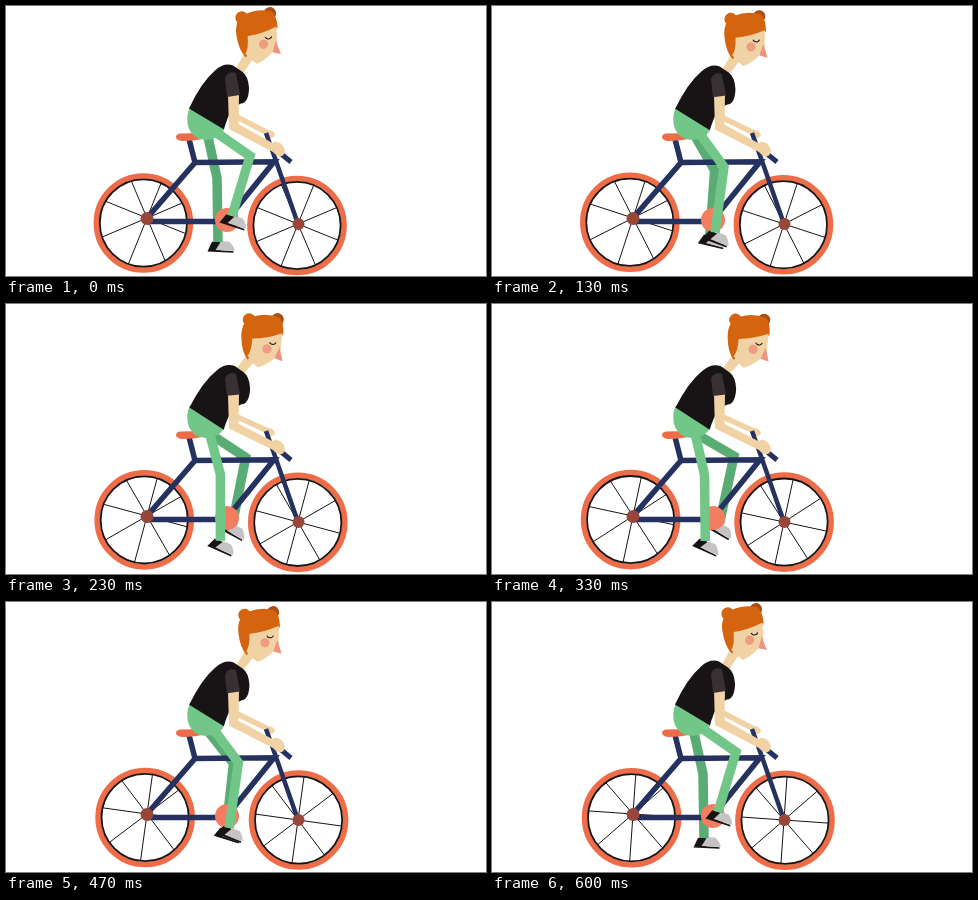
Animation, 480 px wide and 270 px high, one loop 630 ms. Source, as an HTML page with a canvas:

```html
<!DOCTYPE html>
<html lang="en">
<head>
<meta charset="utf-8">
<title>Cyclist</title>
<style>
html, body { margin: 0; width: 100%; height: 100%; overflow: hidden; background: #fff; }
canvas { display: block; width: 480px; height: 270px; }
</style>
</head>
<body>
<canvas id="stage" width="480" height="270"></canvas>
<script>
const ctx = document.getElementById('stage').getContext('2d');
const LOOP = 630, RAD = Math.PI / 180;
const C = {
  tire: '#ee6c47', disc: '#f37d60', hub: '#98463a', navy: '#25325f', ink: '#181415',
  green: '#71c688', shade: '#5aac75', skin: '#f1d2a4', hair: '#d4650e', bun: '#ab4d14',
  cheek: '#ec9d83', nose: '#f0927f', sleeve: '#393033', shoe: '#c6c3c4'
};

const mix = (a, b, s) => a + (b - a) * s;
function ease(t, from, to) {
  const s = Math.min(1, Math.max(0, (t - from) / (to - from)));
  return s * s * (3 - 2 * s);
}

function line(color, width, pts) {
  ctx.beginPath();
  pts.forEach(p => ctx.lineTo(p[0], p[1]));
  ctx.strokeStyle = color;
  ctx.lineWidth = width;
  ctx.stroke();
}
function poly(color, pts) {
  ctx.beginPath();
  pts.forEach(p => ctx.lineTo(p[0], p[1]));
  ctx.fillStyle = color;
  ctx.fill();
}
function shape(color, d) {
  ctx.fillStyle = color;
  ctx.fill(new Path2D(d));
}
function oval(color, x, y, rx, ry = rx, turn = 0) {
  ctx.beginPath();
  ctx.ellipse(x, y, rx, ry, turn * RAD, 0, 7);
  ctx.fillStyle = color;
  ctx.fill();
}
function arc(color, width, x, y, r, from = 0, to = 7) {
  ctx.beginPath();
  ctx.arc(x, y, r, from, to);
  ctx.strokeStyle = color;
  ctx.lineWidth = width;
  ctx.stroke();
}
function at(x, y, deg, draw) {
  ctx.save();
  ctx.translate(x, y);
  ctx.rotate(deg * RAD);
  draw();
  ctx.restore();
}

function wheel(x, y, hubX, hubY, turn) {
  const r = 43.6, ox = hubX - x, oy = hubY - y;
  arc(C.tire, 5.6, x, y, 47);
  arc(C.ink, 1.8, x, y, r);
  for (let i = 0; i < 8; i++) {
    // from the off-centre hub out to the rim
    const a = (turn + i * 45) * RAD, dx = Math.cos(a), dy = Math.sin(a);
    const b = ox * dx + oy * dy;
    const len = Math.sqrt(b * b - ox * ox - oy * oy + r * r) - b;
    line(C.ink, 1, [[hubX, hubY], [hubX + dx * len, hubY + dy * len]]);
  }
}

function leg(color, hip, knee, ankle, tilt) {
  at(ankle[0], ankle[1], tilt, () => {
    poly(C.ink, [[-6, 0], [4, 0], [3, 8], [16, 8.5], [16, 10], [-10, 10]]);
    shape(C.shoe, 'M3 -1 L11 -1 Q17 4 17 8 L-2 8Z');
  });
  line(color, 9.5, [hip, knee, ankle]);
}

function bike() {
  line(C.navy, 5.5, [[183, 133], [189, 156.5], [141, 212]]);
  line(C.navy, 5.5, [[188, 156.6], [268, 155.8], [220, 215]]);
  line(C.navy, 5.5, [[141, 215.6], [220, 215.6]]);
  line(C.navy, 4.5, [[260, 127], [270, 155], [292, 218]]);
  line(C.navy, 5, [[268, 142], [285, 156]]);
  oval(C.hub, 141, 212.5, 6.5);
  oval(C.hub, 292.5, 218, 6);
  oval(C.disc, 221, 214, 12);
  shape(C.tire, 'M174 127.5 L200 127 L200 132 Q190 135 176 135 Q170 134 170 131 Q170 128 174 127.5Z');
}

function head() {
  poly(C.skin, [[-6, 3], [3, 5], [17, -10], [10, -18]]);
  oval(C.bun, 40.5, -52, 6.2);
  oval(C.hair, 12, -52, 6.4);
  shape(C.hair, 'M4 -35 Q4 -51 16 -55 Q29 -59 42 -54 Q47 -49 46 -37 L40 -30 L18 -20 L10 -12 Q4 -20 4 -35Z');
  shape(C.skin, 'M15 -33 Q30 -33 45 -38 L43 -20 Q36 -9 20 -4 Q14 -9 10 -16 Q14 -20 15 -33Z');
  poly(C.nose, [[42, -24], [45, -10], [37, -13]]);
  oval(C.cheek, 29.5, -22.5, 4.6);
  arc(C.ink, 1.1, 35.5, -30.5, 3.6, 0.5, 2.8);
}

function draw(t) {
  const u = ease(t, 30, 270) - ease(t, 310, 580);
  const v = ease(t, 30, 270) - ease(t, 360, 590);
  const k = t / 600, turn = 22 - 18 * k, lift = 1.5 * Math.sin(2.2 * k);
  ctx.fillStyle = '#fff';
  ctx.fillRect(0, 0, 480, 270);

  wheel(137.4 + 2.2 * k, 217 - lift, 141, 212, turn);
  wheel(291 + 2 * k, 219.5 - lift, 292, 218, turn);

  leg(C.shade, [202 + 4 * u, 131],
    [mix(211, 242, v), mix(172, 152, v)],
    [mix(212, 227.5, v), mix(236, 219.5, v)], mix(3, 30, v));
  line(C.skin, 5.5, [[231, 111 + 2 * u], [262, 127]]);
  oval(C.skin, 264, 128, 5, 3.6, 25);
  bike();

  leg(C.green, [208 - 6 * u, 125],
    [mix(244, 212, u), mix(150, 171, u) + 13 * u * (1 - u)],
    [226 - 13 * u ** 1.5, mix(237, 210, (1 - u) ** 2)], mix(18, 24, u));
  shape(C.green, 'M184 101 Q179 112 183 123 Q188 134 200 134 Q214 133 218 124 L216 118Z');

  at(232 - u * 0.3, 65 + 3 * u, -9 * (1 - u), head);
  at(200, 115.4 + 1.8 * u, 2 * u, () => {
    shape(C.ink, 'M-17 -13 Q-5 -39 9 -51 Q18 -59 27 -56 L36 -50 Q42 -46 43 -34 C43 -24 40 -18 35 -18 L27 -14 Q21 -4 18 8Z');
  });

  const s = 3 * u;
  poly(C.skin, [[222, 88 + s], [233, 87 + s], [232.5, 118 + s * 0.6], [270, 139], [267, 146], [223, 123 + s * 0.5]]);
  shape(C.sleeve, `M219 ${72 + s} Q222 ${64 + s} 230 ${67 + s} L234 ${89 + s * 0.5} L221 ${91 + s * 0.3}Z`);
  oval(C.skin, 272, 143, 8, 5.8, 50);
}

function tick(now) {
  // 30 pictures per second, each start rounded to 10 ms
  const slot = Math.floor((now % LOOP) / 10);
  const step = Math.ceil(0.3 * (slot + 0.5)) - 1;
  draw(Math.round(step * 10 / 3) * 10);
  requestAnimationFrame(tick);
}
draw(0);
requestAnimationFrame(tick);
</script>
</body>
</html>
```
